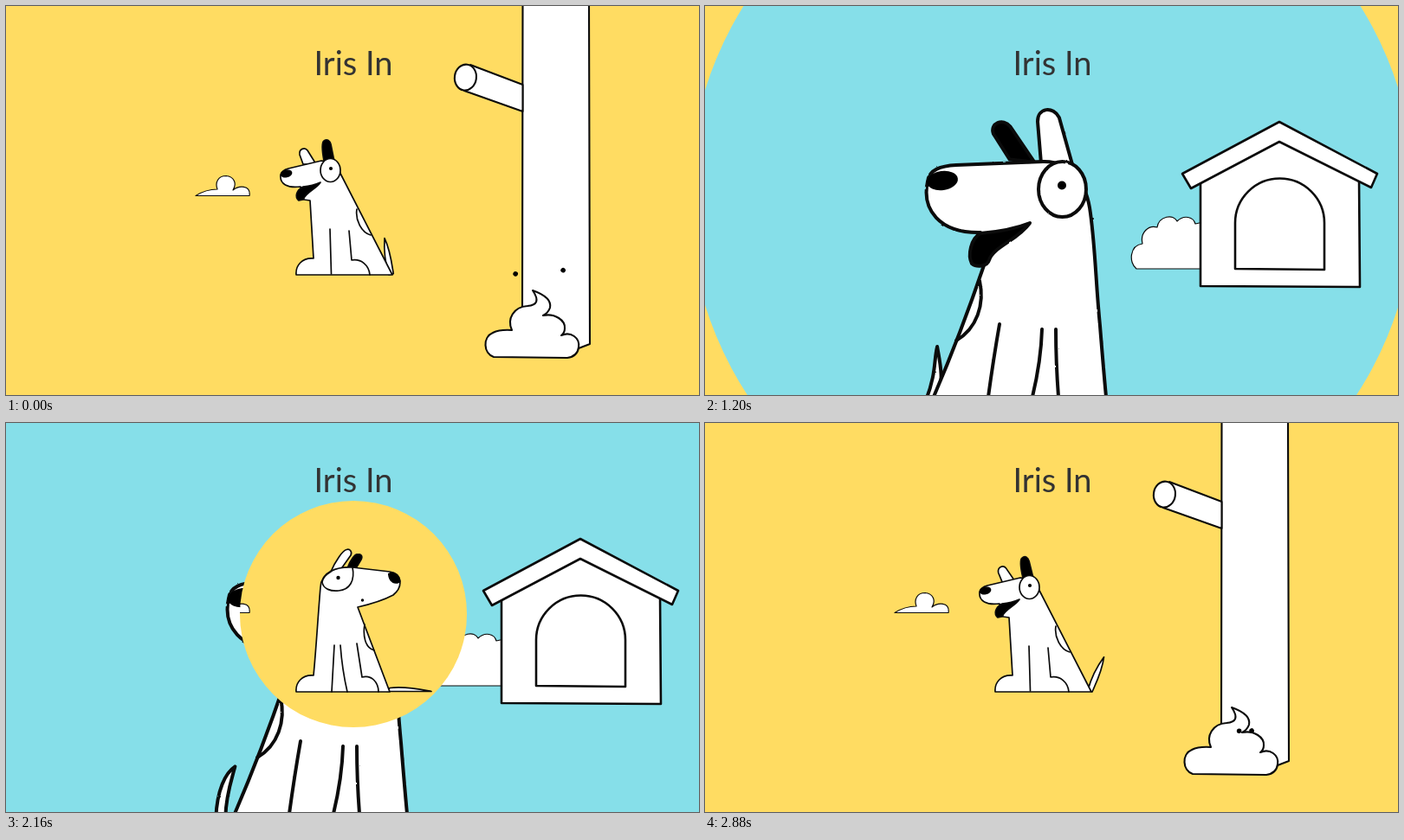
Animation of 800x450 px, one loop 2.92 s. Source, as an HTML page without scripts:

```html
<!DOCTYPE html>
<html lang="en">
<head>
<meta charset="utf-8">
<title>Iris In</title>
<style>
  html, body { margin: 0; width: 100%; height: 100%; overflow: hidden; background: #ffdc62; }
  svg { display: block; width: 100vw; height: 100vh; }
  .ink { fill: #fff; stroke: #0b0b0b; stroke-width: 1.7; stroke-linejoin: round; stroke-linecap: round; }
  .big { stroke-width: 4; }
  .house { stroke-width: 2.6; }
  .mid { stroke-width: 2.1; }
  .thin { stroke-width: 1.2; }
  .solid { fill: #000; }
  .line { fill: none; }
  .dot { fill: #000; stroke: none; }
  .title { font: 38px Lato, "Open Sans", sans-serif; fill: #333; text-anchor: middle; }

  .y-calm, .y-happy, .b-calm, .b-happy { animation: 2.92s step-end infinite; }
  .y-calm { animation-name: yCalm; }
  .y-happy { animation-name: yHappy; }
  .b-calm { animation-name: bCalm; }
  .b-happy { animation-name: bHappy; }
  @keyframes yCalm { 0% { visibility: hidden } 13.7% { visibility: visible } 87.67% { visibility: hidden } }
  @keyframes yHappy { 0% { visibility: visible } 13.7% { visibility: hidden } 87.67% { visibility: visible } }
  @keyframes bCalm { 0% { visibility: visible } 35.6% { visibility: hidden } }
  @keyframes bHappy { 0% { visibility: hidden } 35.6% { visibility: visible } }
</style>
</head>
<body>
<svg viewBox="0 0 800 450">
  <defs>
    <filter id="rough" filterUnits="userSpaceOnUse" x="0" y="0" width="800" height="450" color-interpolation-filters="sRGB">
      <feTurbulence type="fractalNoise" baseFrequency=".14" seed="4"/>
      <feDisplacementMap in="SourceGraphic" scale="2" xChannelSelector="R" yChannelSelector="G"/>
    </filter>

    <!-- white opens the yellow scene, black closes it -->
    <mask id="iris" maskUnits="userSpaceOnUse" x="0" y="0" width="800" height="450">
      <circle cx="401" cy="221" r="480" fill="#fff">
        <animate attributeName="r" dur="2.92s" repeatCount="indefinite"
          keyTimes="0;.5137;.5137;.6575;.6712;.6849;.6986;.7329;.7671;.8082;.8904;.9589;.9863;1"
          values="480;480;0;0;9;28;52;117;184;248;378;459;480;480"/>
      </circle>
      <circle cx="400.500" cy="221.500" r="0" fill="#000">
        <animate attributeName="r" dur="2.92s" repeatCount="indefinite"
          keyTimes="0;.1507;.1644;.1781;.1918;.2466;.3014;.3425;.3836;.411;.452;.4795;.6;.6;1"
          values="0;0;9;28;52;157;257;324;386;419;460;480;480;0;0"/>
      </circle>
    </mask>
  </defs>

  <!-- blue scene -->
  <rect width="800" height="450" fill="#86dfe9"/>
  <g class="ink">
    <path class="thin" d="M498 304C489 297 490 277 505 275C502 262 512 253 522 256C524 243 541 240 545 249C553 241 564 244 566 252L580 249V304Z"/>
    <g class="house">
      <path d="M572 198V324L756 325L755 198L663 148Z"/>
      <path d="M551 194L663 134L776 194L769 210L663 157L561 211Z"/>
      <path d="M612 304V251A51.5 51.5 0 0 1 715 251V305Z"/>
    </g>
  </g>
  <g class="ink big" filter="url(#rough)">
    <g class="b-calm">
      <path d="M380 156L357 114C355 101 369 95 378 105L415 165Z"/>
      <path class="solid" d="M345 155L328 127C325 116 336 110 343 117L371 154Z"/>
      <path d="M267 452C280 415 296 370 318 312Q331 285 336 264C270 240 221 220 218 196C217 180 228 166 246 165L352 156C400 148 431 164 440 196C449 225 449 290 455 350Q459 410 463 452"/>
      <ellipse class="dot" cx="233" cy="181" rx="16" ry="14" transform="rotate(-35 233 181)"/>
      <path class="line" d="M351 157C344 192 362 219 395 219C415 219 432 211 440 196"/>
      <circle class="dot" cx="390.500" cy="182.500" r="5.500"/>
      <circle class="dot" cx="320" cy="244" r="4"/>
      <path class="line" d="M318 316C324 345 314 373 290 388"/>
    </g>

    <g class="b-happy">
      <path d="M266 398C254 405 245 425 243 456H254C255 430 262 412 266 398Z">
        <animate attributeName="d" dur="243.333ms" repeatCount="indefinite"
          keyTimes="0;.12;.3;.5;.7;.89;.93;1"
          values="M269 394C265 410 268 425 256 456H270C276 430 272 412 269 394Z;
                  M266 398C254 405 245 425 243 456H254C255 430 262 412 266 398Z;
                  M233 385C230 405 219 425 229 456H240C232 430 235 412 233 385Z;
                  M201 402C202 420 206 437 217 456H231C219 440 209 423 201 402Z;
                  M233 385C230 405 219 425 229 456H240C232 430 235 412 233 385Z;
                  M266 398C254 405 245 425 243 456H254C255 430 262 412 266 398Z;
                  M268 394C264 410 267 425 255 456H269C276 430 271 412 268 394Z;
                  M269 394C265 410 268 425 256 456H270C276 430 272 412 269 394Z"/>
      </path>
      <g>
        <animateTransform attributeName="transform" type="rotate" dur="292ms" repeatCount="indefinite"
          keyTimes="0;.1;.575;1" values="6 390 185;7 390 185;0 390 185;6 390 185"/>
        <path d="M388 184L378 135C376 118 394 115 402 127L428 190Z"/>
        <path class="solid" d="M351 182L329 155C323 143 338 135 347 144L380 182Z"/>
      </g>
      <path d="M264 452C282 410 300 365 322 300L318 262C270 263 250 235 257 203C259 189 272 185 290 184L390 180C425 179 441 207 445 240C451 285 451 320 456 370Q460 420 463 452"/>
      <path class="solid" d="M375 251C360 257 340 261 318 263C307 269 303 288 308 298C314 303 326 301 328 294C332 279 361 271 375 251Z"/>
      <ellipse class="dot" cx="274" cy="202" rx="18" ry="11" transform="rotate(-8 274 202)"/>
      <ellipse cx="412.500" cy="212" rx="27.500" ry="32"/>
      <circle class="dot" cx="412" cy="207.500" r="5"/>
      <path class="line" d="M317 318C323 345 314 373 290 387"/>
    </g>
    <path class="line" d="M340 368Q333 408 327 452M389 374Q388 410 378 452M405 374Q405 412 408 452"/>
  </g>

  <!-- yellow scene -->
  <g mask="url(#iris)">
    <rect width="800" height="450" fill="#ffdc62"/>
    <g class="ink">
      <path class="thin" d="M219 219.500C226 215 236 212 244 212C241 204 245 196.500 254 196.500C263 197 267 205 262 213C268 208 283 206 281 219.500Z"/>
      <g class="mid">
        <path d="M596.500 -5L596 360L620 405L661 396L674 391L673 -5Z"/>
        <path d="M536 68L596.500 91V122L529 98"/>
        <ellipse cx="530.500" cy="82.500" rx="12.500" ry="15" transform="rotate(8 530 82)"/>
        <path d="M563 406C551 402 550 383 562 378Q570 374 584 375C578 362 586 348 602 347C613 346 616 341 608 329C622 334 630 340 628 349Q626 355 620 358C634 355 646 364 645 373Q645 378 641 381C652 376 663 384 661 395C660 403 655 406 648 407Z"/>
      </g>

      <g class="y-calm">
        <path d="M443 306.500C460 304 478 308 491 310.500H440Z"/>
        <path d="M375 172C380 160 389 147 393 146.500C397 145 400 149 398 153L386 170Z"/>
        <path class="solid" d="M394 168C398 158 403 151 406 152C410 151 412 154 410 158L404 168Z"/>
        <path d="M335 311C334 300 342 291 355 292C358 262 360 225 363 190C364 172 382 166 400 167L443 172C457 174 459 189 447 199Q432 207 406 213L443 311Z"/>
        <path class="dot" d="M441 174C449 170 456 177 455.500 184C448 189 441 183 441 174Z"/>
        <path class="line" d="M375 172Q366 177 365 184C366 192 375 195 384 194C397 193 403 182 400 167"/>
        <circle class="dot" cx="383.500" cy="179" r="2.200"/>
        <circle class="dot" cx="411.500" cy="205" r="1.700"/>
        <path class="line" d="M414 233C412 245 414 260 425 263M379 257L376 311M386 257Q388 285 394 311M405 255L411 294C422 291 430 300 430 311"/>
      </g>

      <g class="y-happy">
        <path d="M442 309C446 295 452 283 461 271C459 286 452 300 447 311Z">
          <animateTransform attributeName="transform" type="rotate" dur="243.333ms" repeatCount="indefinite"
            keyTimes="0;.07;.57;.836;1" values="-33 445 310;-37 445 310;27 445 310;0 445 310;-33 445 310"/>
        </path>
        <g>
          <animateTransform attributeName="transform" type="rotate" dur="292ms" repeatCount="indefinite"
            keyTimes="0;.1;.575;1" values="0 368 180;1 368 180;-8 368 180;0 368 180"/>
          <path d="M343 183L339 172C338 165 345 163 348 167L358 183Z"/>
          <path class="solid" d="M367 179C365 168 364 158 367 156C371 153 374 156 375 160L379 180Z"/>
        </g>
        <path d="M335 311C334 300 342 291 355 292L351 225L344 224L340 209C325 211 316 206 317 196Q318 190 326 188L364 179L379 180L446 311Z"/>
        <path class="solid" d="M363 204Q354 208 343 209C335 213 333 221 338 225L343 224C346 215 358 212 363 204Z"/>
        <ellipse class="dot" cx="323.500" cy="194" rx="7" ry="4.500" transform="rotate(-12 323 194)"/>
        <ellipse cx="374.500" cy="190" rx="11.500" ry="13.500"/>
        <circle class="dot" cx="375" cy="188" r="2.100"/>
        <path class="line" d="M405 235C403 247 410 262 421 265M374 258L375.500 310M396 260L399 294C410 292 419 300 420 311"/>
      </g>
    </g>

    <!-- flies -->
    <g transform="translate(618 330)" class="dot">
      <circle cx="36" r="2.800">
        <animate attributeName="cx" dur="2.92s" repeatCount="indefinite"
          keyTimes="0;.1918;.3014;.8082;.9863;1" values="36;35;27;22;26;36"/>
        <animateTransform attributeName="transform" type="rotate" dur="2.92s" repeatCount="indefinite"
          keyTimes="0;.1918;.3014;.8082;.9863;1" values="211;1923;2884;7510;9090;9211"/>
      </circle>
      <circle cx="35" r="2.800">
        <animate attributeName="cx" dur="2.92s" repeatCount="indefinite"
          keyTimes="0;.1918;.9863;1" values="35;34;29;35"/>
        <animateTransform attributeName="transform" type="rotate" dur="2.92s" repeatCount="indefinite"
          keyTimes="0;.1918;.9863;1" values="-41.500;-1508;-7494;-7601.500"/>
      </circle>
    </g>
  </g>

  <text class="title" x="401" y="80">Iris In</text>
</svg>
</body>
</html>
```
